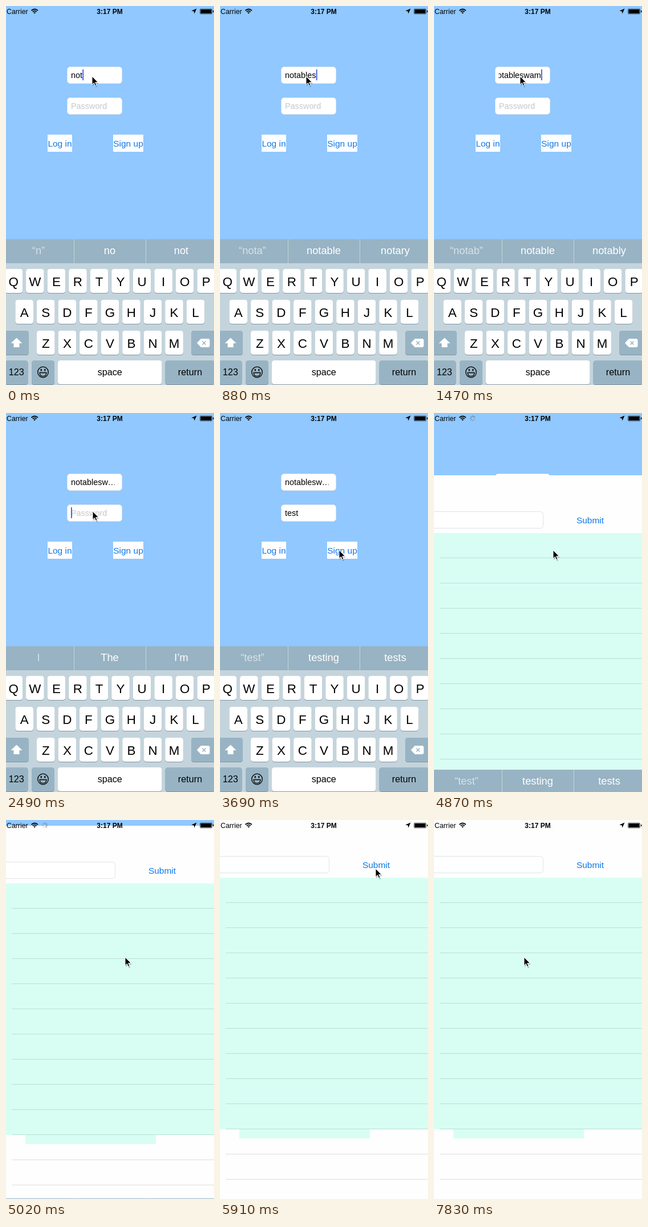
Write an HTML page that moves like this. It is 365 px wide and 663 px high and loops after 8000 ms.

```html
<!DOCTYPE html>
<html lang="en">
<head>
<meta charset="utf-8">
<title>Sign up screen</title>
<style>
  html, body { margin: 0; width: 100%; height: 100%; overflow: hidden; background: #90c8ff; }
  svg { display: block; font-family: "Liberation Sans", Arial, sans-serif; }
  text { white-space: pre; }
  .mid { text-anchor: middle; }
  .field { fill: #fff; stroke: #dfe3e8; stroke-width: 1; }
  .input { font-size: 14.4px; }
  .link { font-size: 15.5px; fill: #0f77e8; }
  .hint { font-size: 18.3px; fill: #fff; }
  .letter { font-size: 22.4px; }
  .word { font-size: 16.2px; }
  .rule { stroke: #000; stroke-opacity: .13; }
</style>
</head>
<body>
<svg width="365" height="663" viewBox="0 0 365 663">
  <defs>
    <clipPath id="inner"><rect x="113.5" y="100" width="77" height="100"/></clipPath>
  </defs>
  <rect width="365" height="663" fill="#90c8ff"/>

  <g id="login">
    <rect class="field" x="107.5" y="106.5" width="96" height="29" rx="5"/>
    <rect class="field" x="107.5" y="160.5" width="96" height="29" rx="5"/>
    <g clip-path="url(#inner)">
      <text id="user" class="input" x="114" y="126"/>
      <text id="pass" class="input" x="114" y="180"/>
      <rect id="caret" width="1.8" height="19" fill="#3a5be0"/>
    </g>
    <rect x="73" y="225" width="43" height="30" fill="#fff"/>
    <text class="link mid" x="94.5" y="246">Log in</text>
    <rect x="188" y="225" width="53" height="30" fill="#fff"/>
    <text class="link mid" x="214.5" y="246">Sign up</text>
  </g>

  <g id="list">
    <rect width="365" height="700" fill="#fefefe"/>
    <rect class="field" x="-20" y="63.5" width="211.5" height="29" rx="5"/>
    <text class="link mid" x="274" y="84">Submit</text>
    <rect y="101" width="365" height="440" fill="#d8fef3"/>
    <rect x="34" y="541" width="229" height="16" fill="#d8fef3"/>
  </g>

  <g id="keyboard">
    <rect y="408" width="365" height="42" fill="#98b3c3"/>
    <rect y="450" width="365" height="213" fill="#c4d4dd"/>
    <path d="M119.5 408v42M245.5 408v42" stroke="#c4d4dd"/>
    <text class="hint mid" x="57" y="434" fill-opacity=".62"/>
    <text class="hint mid" x="182" y="434"/>
    <text class="hint mid" x="307.5" y="434"/>
    <g id="keys"></g>
    <path d="M18.5 580.5l10 9.5h-5v7h-10v-7h-5z" fill="#fff"/>
    <path d="M335 589.5l7-7.5h12.500q3 0 3 3v9q0 3-3 3h-12.500z" fill="#fff"/>
    <path d="M344.500 586.500l6 6m0-6l-6 6" stroke="#98b4c4" stroke-width="1.500"/>
    <g fill="none" stroke="#000" stroke-width="1.3">
      <circle cx="65" cy="640.5" r="9.3"/>
      <path d="M59 641.5h12q-.5 6.200-6 6.200t-6-6.200z"/>
      <path d="M61.700 635v3.500M68.300 635v3.500" stroke-width="2"/>
    </g>
  </g>

  <g id="status" font-size="12.3">
    <text x="1" y="13.5">Carrier</text>
    <g fill="none" stroke="#000" stroke-width="1.7">
      <path d="M44.500 8q5.700-5 11.400 0M46.700 10.200q3.500-3 7 0"/>
    </g>
    <path d="M50.200 13.600l-2-2.200q2-1.400 4 0z"/>
    <text class="mid" x="182" y="13.5" font-weight="bold" font-size="12">3:17 PM</text>
    <path d="M334.500 4.500l-4 9-.9-4.200-4.300-.8z"/>
    <rect x="340.500" y="5" width="21" height="9" rx="1.500" fill="none" stroke="#000" stroke-opacity=".6"/>
    <rect x="341.500" y="6" width="19" height="7"/>
    <path d="M363 7.500q1.500 .3 1.500 2t-1.500 2z"/>
    <g id="spinner" stroke="#444" stroke-width="1"></g>
  </g>

  <g id="pointer">
    <path d="M1 2v15l3.500-3 2.200 5 2.500-1-2.200-5h5z" opacity=".25"/>
    <path d="M0 0v14.500l3.400-3.100 2.300 5.200 2.300-1-2.300-5.100h4.700z" stroke="#fff" stroke-width="1"/>
  </g>
</svg>

<script>
const LOOP = 8000, TICK = 147.7, LAST = 53;
const USER = 'notableswamp', PASS = 'test';
const $ = id => document.getElementById(id);

function add(parent, tag, attrs, text) {
  const el = document.createElementNS('http://www.w3.org/2000/svg', tag);
  for (const k in attrs) el.setAttribute(k, attrs[k]);
  if (text) el.textContent = text;
  parent.appendChild(el);
  return el;
}

// Keyboard
function key(x, y, w, label, cls, fill = '#fff') {
  const box = { x, width: w, height: 42, rx: 4.5 };
  add($('keys'), 'rect', { ...box, y: y + 1, fill: '#82949f' });
  add($('keys'), 'rect', { ...box, y, fill });
  if (label) add($('keys'), 'text', { x: x + w / 2, y: y + (cls === 'letter' ? 29.5 : 26), class: cls + ' mid' }, label);
}
[['QWERTYUIOP', 13.3, 460], ['ASDFGHJKL', 32.2, 514], ['ZXCVBNM', 69.8, 568]].forEach(([row, cx, y]) =>
  [...row].forEach((c, n) => key(cx - 15.8 + n * 37.55, y, 31.6, c, 'letter')));
const GREY = '#98b4c4';
key(-6, 568, 46, '', 'word', GREY);
key(325, 568, 46, '', 'word', GREY);
key(-2, 620, 40.5, '123', 'word', GREY);
key(45, 620, 40, '', 'word', GREY);
key(91, 620, 182.5, 'space', 'word');
key(279.5, 620, 87, 'return', 'word', GREY);

for (let n = 0; n < 13; n++) {
  const y = 144.5 + n * 44;
  add($('list'), 'line', { x1: 10, x2: 365, y1: y, y2: y, class: 'rule' });
}
const spokes = Array.from({ length: 8 }, (_, n) =>
  add($('spinner'), 'path', { d: 'M0 -2.3V-5', transform: `translate(68 9.3) rotate(${n * 45})` }));

// Tables of [first tick, value...]
const userLen = [[0, 3], [1, 4], [3, 5], [4, 6], [5, 7], [6, 8], [8, 9], [9, 10], [10, 11], [11, 12]];
const passLen = [[0, 0], [18, 1], [19, 2], [20, 3], [21, 4]];
const hints = [
  [0, '“n”', 'no', 'not'],
  [2, '“not”', 'not', 'note'],
  [5, '“nota”', 'notable', 'notary'],
  [7, '“notab”', 'notable', 'notably'],
  [12, `“${USER}”`, '', ''],
  [15, 'I', 'The', 'I’m'],
  [19, '“t”', 'to', 'the'],
  [21, '“te”', 'ten', 'tell'],
  [23, '“test”', 'testing', 'test'],
  [24, '“test”', 'testing', 'tests']
];
const path = [
  [0, 151, 123], [12, 151, 132], [13, 151, 155], [14, 152, 172],
  [22, 168, 190], [23, 193, 222], [24, 209, 240],
  [39, 244, 160], [40, 273, 85],
  [45, 278, 130], [46, 288, 230], [47, 297, 360], [48, 300, 500], [49, 292, 610],
  [50, 268, 647], [51, 234, 535], [52, 196, 390], [53, 158, 240]
];
const at = (table, i) => table.filter(row => row[0] <= i).pop().slice(1);

const hintEls = document.querySelectorAll('.hint');
const move = (el, x, y) => el.setAttribute('transform', `translate(${x} ${y})`);
const show = (el, on) => el.setAttribute('visibility', on ? 'visible' : 'hidden');

// Critically damped spring used by the screen change
function slide(i) {
  if (i < 32) return 0;
  const x = 0.36 + 2.895 * (i - 32);
  return 1 - (1 + x) * Math.exp(-x);
}

function placeText(el, text, active) {
  el.textContent = text;
  const w = el.getComputedTextLength();
  const x = active ? Math.min(114, 187.7 - w) : 114;
  el.setAttribute('x', x);
  return x + w;
}

function draw(i) {
  const onPass = i >= 15;
  const name = USER.slice(0, at(userLen, i)[0]);
  const word = PASS.slice(0, at(passLen, i)[0]);
  const userEnd = placeText($('user'), onPass ? USER.slice(0, 9) + '…' : name, !onPass);
  const passEnd = placeText($('pass'), word || 'Password', false);
  $('pass').setAttribute('fill', word ? '#000' : '#c7c7cd');

  const caretX = !onPass ? userEnd : word ? passEnd : 113.7;
  $('caret').setAttribute('x', caretX + 0.3);
  $('caret').setAttribute('y', onPass ? 165 : 111);
  show($('caret'), !(i >= 22 && i < 26 || i >= 29 && i < 32));

  at(hints, i).forEach((s, n) => { hintEls[n].textContent = s; });

  const p = slide(i);
  move($('keyboard'), 0, Math.round(258 * p));
  move($('list'), 0, Math.round(663 * (1 - p)));
  show($('list'), p > 0);

  show($('spinner'), i >= 28 && i < 36);
  spokes.forEach((s, n) => s.setAttribute('opacity', 0.2 + 0.8 * ((n - i * 2 + 160) % 8) / 8));
  move($('pointer'), ...at(path, i));
}

let shown = -1;
function frame() {
  const t = performance.now() % LOOP;
  const i = Math.min(LAST, Math.floor((t + 24) / TICK));
  if (i !== shown) draw(shown = i);
  requestAnimationFrame(frame);
}
frame();
</script>
</body>
</html>
```
